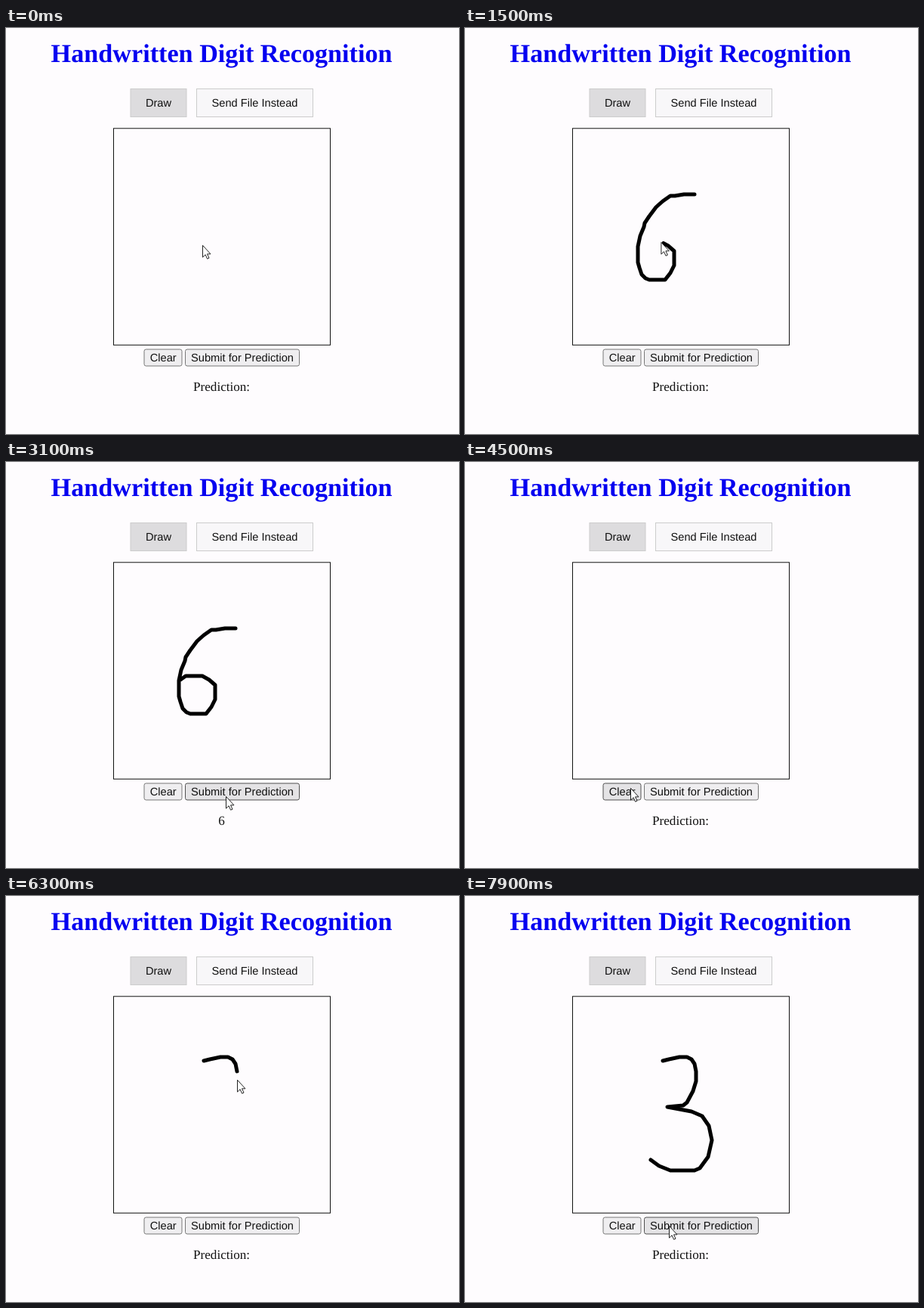
Write an HTML page that moves like this. It is 600x537 px and loops after 8000 ms.

```html
<!DOCTYPE html>
<html lang="en">
<head>
<meta charset="utf-8">
<title>Handwritten Digit Recognition</title>
<style>
  html, body { margin: 0; width: 100%; height: 100%; overflow: hidden; background: #fefcfe; }
  svg { display: block; }
  text { text-anchor: middle; text-rendering: geometricPrecision; }
  .serif { font: 17.1px "Liberation Serif", serif; fill: #111; }
  .sans { font: 14.65px "Liberation Sans", sans-serif; fill: #111; }
  .heading { font: bold 34.2px "Liberation Serif", serif; fill: #0500f0; }
  .tab { fill: #f8f7f9; stroke: #ccc; }
  .tab.active { fill: #dddcde; }
  .button { fill: #efeef0; stroke: #767676; }
  .button.hover { fill: #e4e3e5; stroke: #4f4f4f; }
  .ink { fill: none; stroke: #000; stroke-width: 5; stroke-linecap: round; stroke-linejoin: round; }
</style>
</head>
<body>
<svg width="600" height="537" viewBox="0 0 600 537">
  <text class="heading" x="285.6" y="44.5">Handwritten Digit Recognition</text>

  <rect class="tab active" x="165" y="80.5" width="74" height="37"/>
  <text class="sans" x="202" y="104">Draw</text>
  <rect class="tab" x="252.5" y="80.5" width="154" height="37"/>
  <text class="sans" x="329.5" y="104">Send File Instead</text>

  <rect x="142.5" y="132.8" width="287" height="286.5" fill="none" stroke="#111"/>
  <polyline id="six" class="ink" points="304,220 290,220 278,222 272,222 262,229 253,237 244,249 238,258
    237,263 232,275 229,289 229,302 229,310 231,317 234,326 239,331 244,333 265,333 272,324 277,314
    277,295 269,288 260,283 238,283 231,288"/>
  <polyline id="three" class="ink" points="262,218 270,216 284,213 294,213 300,216 304,222 306,232 306,245
    302,258 294,273 289,277 268,279 300,285 314,291 323,304 327,323 322,345 311,360 304,363 272,363
    257,357 246,349"/>

  <rect id="clear" class="button" x="183" y="425" width="50" height="22" rx="2.5"/>
  <text class="sans" x="208.2" y="441">Clear</text>
  <rect id="submit" class="button" x="237.5" y="425" width="151" height="22" rx="2.5"/>
  <text class="sans" x="313" y="441">Submit for Prediction</text>

  <text id="result" class="serif" x="285.6" y="480"></text>
  <path id="cursor" d="M.5,.5V16.2L4.1,12.8L6.6,18.3L9,17.2L6.5,11.9H11Z" fill="#fff" stroke="#222" stroke-linejoin="round"/>
</svg>
<script>
const LOOP = 8000, STEP = 100;
const byId = id => document.getElementById(id);
const [cursor, result] = ["cursor", "result"].map(byId);
const buttons = ["clear", "submit"].map(byId);

// progress: [time, drawn length]; lead: how far the pointer runs ahead of the ink
const strokes = [
  { line: byId("six"), progress: [[300, 0], [900, 143]], end: 1700, erased: 4300, lead: 4 },
  { line: byId("three"), progress: [[5900, 0], [6300, 56.6]], end: 7600, erased: LOOP, lead: 11 },
];
for (const s of strokes) {
  s.total = s.line.getTotalLength();
  s.start = s.progress[0][0];
  s.progress.push([s.end, s.total]);
}

// Pointer positions between strokes: [time, x, y]
const moves = [
  [0, 260, 287], [300, 304, 220],
  [1800, 231, 288], [2300, 289, 442], [2700, 291, 442],
  [3500, 291, 442], [4100, 219, 431], [4500, 219, 431],
  [5200, 299, 221], [5300, 299, 221], [5700, 262, 219],
  [7700, 246, 349], [7900, 270, 436],
];

const linear = p => p;
const smooth = p => p * p * (3 - 2 * p);

function interpolate(keys, time, ease) {
  const next = keys.findIndex(k => k[0] > time);
  if (next < 0) return keys.at(-1).slice(1);
  if (next === 0) return keys[0].slice(1);
  const a = keys[next - 1], b = keys[next];
  const p = ease((time - a[0]) / (b[0] - a[0]));
  return a.slice(1).map((v, i) => v + (b[i + 1] - v) * p);
}

function render(time) {
  let [x, y] = interpolate(moves, time, smooth);

  for (const { line, progress, start, end, erased, lead, total } of strokes) {
    const [drawn] = interpolate(progress, time, linear);
    line.style.visibility = drawn > 0 && time < erased ? "visible" : "hidden";
    line.style.strokeDasharray = drawn < total ? `${drawn} 2000` : "none";
    if (time >= start && time <= end) {
      ({ x, y } = line.getPointAtLength(Math.min(drawn + lead, total)));
    }
  }

  cursor.setAttribute("transform", `translate(${x} ${y})`);
  for (const button of buttons) {
    const { x: left, y: top, width, height } = button.getBBox();
    const hover = x >= left && x <= left + width && y >= top && y <= top + height;
    button.classList.toggle("hover", hover);
  }
  result.textContent = time >= 3000 && time < 4300 ? "6" : "Prediction:";
}

const origin = performance.now();
function tick() {
  const elapsed = (performance.now() - origin) % LOOP;
  render(Math.floor(elapsed / STEP) * STEP);
  requestAnimationFrame(tick);
}
tick();
</script>
</body>
</html>
```
